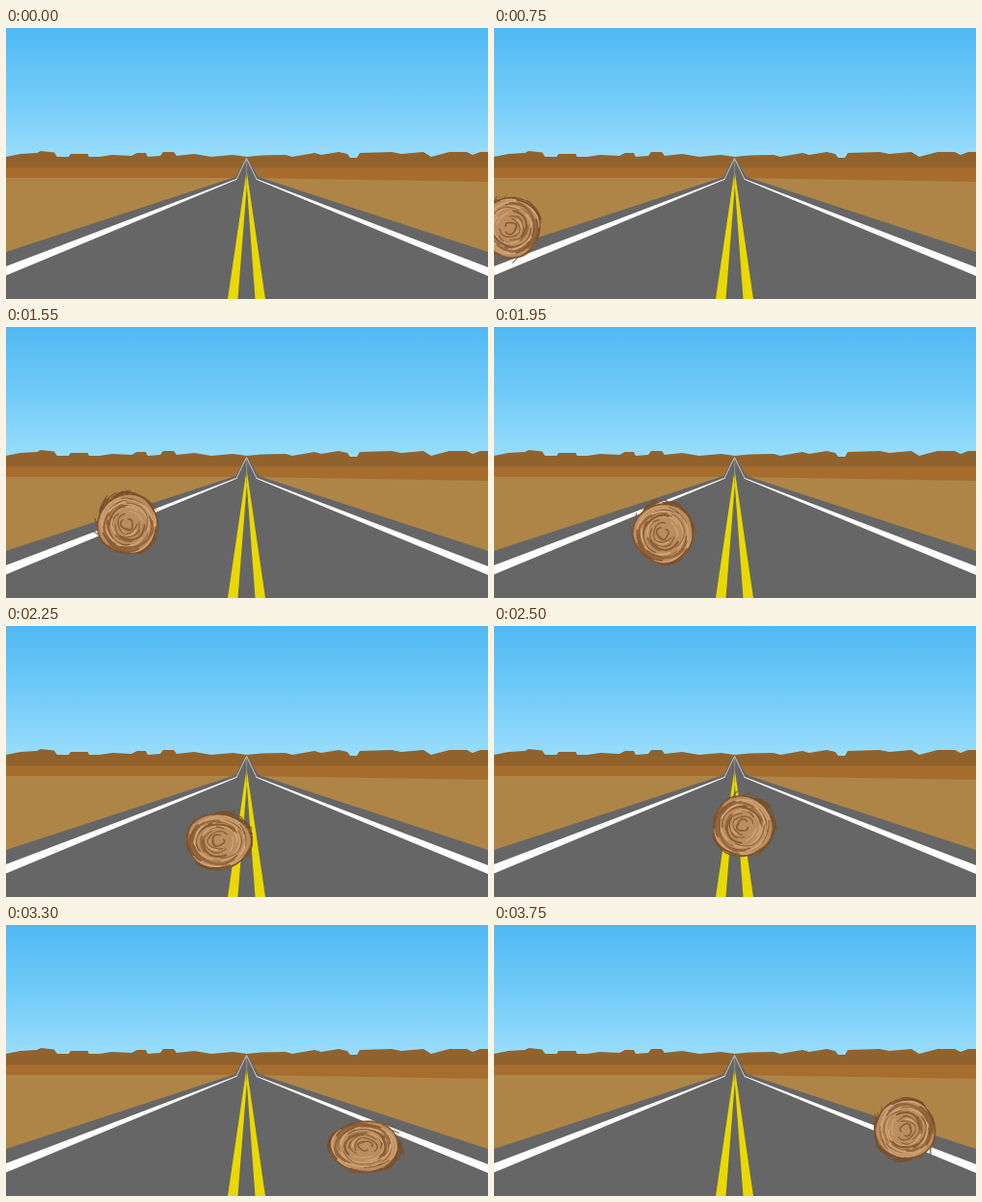
An HTML page with a canvas that plays this animation: 500 by 282 pixels, repeating every 3800 ms.

```html
<!DOCTYPE html>
<html lang="en">
<head>
<meta charset="utf-8">
<title>Tumbleweed</title>
<style>
html, body { margin: 0; width: 100%; height: 100%; overflow: hidden; }
canvas { display: block; }
</style>
</head>
<body>
<canvas id="stage" width="500" height="282"></canvas>
<script>
const W = 500, H = 282, LOOP = 3800, STEP = 50, TAU = Math.PI * 2;
const ctx = document.getElementById('stage').getContext('2d');

const sky = ctx.createLinearGradient(0, 0, 0, 134);
sky.addColorStop(0, '#50b9f3');
sky.addColorStop(0.5, '#70caf8');
sky.addColorStop(1, '#98ddfc');

// Fill colour and outline, back to front
const scenery = [
  [sky, 'M0 0H500V140H0Z'],
  ['#92622c', `M0 134L15 131 32 130 36 128 50 129.500 53 134H65L67 131H85L86 134H97L110 132
    130 133 136 130H145L147 134 160 133 163 129H174L177 133 195 131 213 134 235 132 250 134
    265 132.500 290 132 297 134 320 130 327 132 345 129 354 131 357 135H364L367 130 400 129
    410 131 433 129 441 134 460 129H478L484 132 492 129H500V150H0Z`],
  ['#a66d2f', 'M0 145.500H500V165H0Z'],
  ['#ae8547', 'M0 156L250 156 500 160V282H0Z'],
  ['#666', 'M249.500 134L238 155 0 233V282H500V233L262 155Z'],
  ['#fff', 'M239 157L0 248V257.500L240 157.500Z'],
  ['#fff', 'M260 157L500 249V258L259 157.500Z'],
  ['#e9d900', 'M249.200 151L230 282H240.500L249.700 165Z'],
  ['#e9d900', 'M250 151L269 282H258.500L249.900 165Z']
].map(([color, d]) => [color, new Path2D(d)]);
const farLines = new Path2D('M239 157.500L249.500 135.500 260 157.500');
const farCenter = new Path2D('M249.600 137V153');

function drawScenery() {
  for (const [color, path] of scenery) {
    ctx.fillStyle = color;
    ctx.fill(path);
  }
  ctx.lineWidth = 0.9;
  ctx.strokeStyle = '#d0d0d0';
  ctx.stroke(farLines);
  ctx.lineWidth = 0.7;
  ctx.strokeStyle = '#a8a29a';
  ctx.stroke(farCenter);
}

let seed = 11;
function random() {
  seed = (seed * 16807) % 2147483647;
  return seed / 2147483647;
}
const range = (a, b) => a + (b - a) * random();

// A slightly spiralling stroke around the ball's centre
function strand(radius, start, sweep, drift) {
  const path = new Path2D();
  for (let i = 0; i <= 14; i++) {
    const a = start + sweep * i / 14;
    const r = radius + drift * i / 14 + 0.7 * Math.sin(a * 3 + radius);
    path.lineTo(r * Math.cos(a), r * Math.sin(a));
  }
  return path;
}

function makeStrands() {
  const list = [];
  const add = (color, width, path) => list.push({ color, width, path });
  for (let i = 0; i < 42; i++) {
    const r = 7 + 24 * Math.sqrt(i / 42);
    const color = ['#8a5b34', '#d0a376', '#96683f'][i % 3];
    add(color, range(0.8, 2.1), strand(r, range(0, TAU), range(0.9, 2.2), range(-3, 2)));
  }
  add('#8a5b34', 1.5, strand(5, 0.5, 5.3, 2));
  add('#8a5b34', 1.2, strand(9, 2, 4.4, 2));
  // Dark rim, bushy on one side
  for (let i = 0; i < 16; i++) {
    add('#79502b', range(0.6, 1.4), strand(range(30, 32.5), range(0, TAU), range(0.5, 1.2), range(-1, 2)));
  }
  for (let i = 0; i < 18; i++) {
    add('#79502b', range(0.6, 1.2), strand(range(30, 33), range(-0.8, 0.4), range(0.2, 0.5), range(0, 3.5)));
  }
  // Loose twigs on both flanks
  for (let i = 0; i < 8; i++) {
    const side = i % 2 ? 1.3 : -1.3;
    add('#80562f', 0.8, strand(31, side + range(-0.3, 0.3), 0.18, range(3, 6)));
  }
  return list;
}
const strands = makeStrands();
const body = strand(31.5, 0, TAU, 0);

// time, x, rotation in degrees
const travel = [
  [300, -50, 105], [750, 17, 165], [1200, 83, 225], [1950, 175.5, 275],
  [2500, 258, 340], [3300, 372, 390], [3800, 433, 495]
];
// start, end, height
const bounces = [[-80, 1030, 31], [1030, 2170, 26], [2170, 3290, 27.500], [3290, 4290, 18.500]];
const GROUND = 231;

function travelAt(t) {
  const i = travel.findIndex(key => t < key[0]);
  const a = travel[i - 1], b = travel[i];
  const u = (t - a[0]) / (b[0] - a[0]);
  return [a[1] + (b[1] - a[1]) * u, a[2] + (b[2] - a[2]) * u];
}

function drawBall(t) {
  if (t < travel[0][0]) return;
  const [x, degrees] = travelAt(t);
  const [start, end, height] = bounces.find(b => t < b[1]);
  const u = (t - start) / (end - start);
  const y = GROUND - height * 4 * u * (1 - u);
  const contact = Math.min(t - start, end - t);
  const squash = Math.max(0, 1 - contact / 150);

  ctx.save();
  ctx.translate(x, y);
  ctx.scale(1 + 0.17 * squash, 1 - 0.17 * squash);
  ctx.rotate(degrees * Math.PI / 180);
  ctx.lineCap = 'round';
  ctx.fillStyle = '#bb8d5f';
  ctx.fill(body);
  for (const s of strands) {
    ctx.strokeStyle = s.color;
    ctx.lineWidth = s.width;
    ctx.stroke(s.path);
  }
  ctx.restore();
}

function frame() {
  const t = Math.floor(performance.now() % LOOP / STEP) * STEP;
  ctx.clearRect(0, 0, W, H);
  drawScenery();
  drawBall(t);
  requestAnimationFrame(frame);
}
frame();
</script>
</body>
</html>
```
